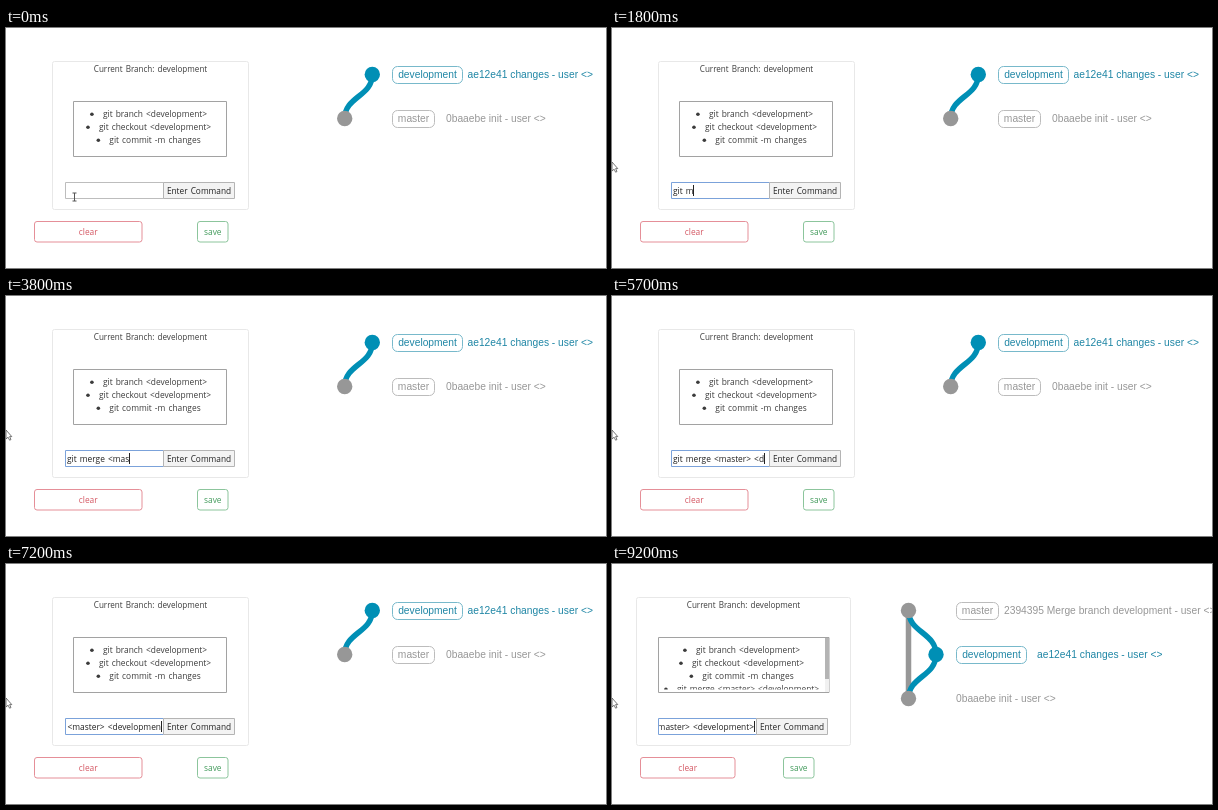
An HTML page with a canvas that plays this animation: 600x240 px, repeating every 9300 ms.

```html
<!DOCTYPE html>
<html lang="en">
<head>
<meta charset="utf-8">
<title>Git command trainer</title>
<style>
  html, body { margin: 0; width: 100%; height: 100%; overflow: hidden; background: #fff; }
  canvas { display: block; }
</style>
</head>
<body>
<canvas width="600" height="240"></canvas>
<script>
const ctx = document.querySelector('canvas').getContext('2d');
const LOOP = 9300, FOCUS = 100, ENTER = 8800, MERGED = 8900;
const INK = '#3c3c3c';
// Each theme has a solid, a text and a border colour.
const BLUE = { solid: '#008fb5', text: '#1f86a5', border: '#78b9cb' };
const GREY = { solid: '#979797', text: '#979797', border: '#bcbcbc' };
const RED = { text: '#d45763', border: '#e58f98' };
const GREEN = { text: '#459c5e', border: '#8cc59c' };
const UI = '"Open Sans", "Noto Sans", sans-serif';
const ARIAL = '"Liberation Sans", Arial, sans-serif';

const COMMAND = 'git merge <master> <development>';
// Moment at which each character of COMMAND is typed, in tenths of a second.
const KEYS = [12, 13, 14, 16, 18, 20, 23, 25, 27, 29, 32, 36, 37, 38, 40, 41, 42, 46, 48,
              54, 57, 59, 60, 62, 63, 65, 66, 67, 69, 70, 75, 79].map(k => k * 100);
const HISTORY = ['git branch <development>', 'git checkout <development>', 'git commit -m changes'];

function setFont(size, family = UI) {
  ctx.font = `${size}px ${family}`;
  ctx.wordSpacing = family === UI ? '0.9px' : '0px';
}

function text(str, x, y, size, color = INK, align = 'left', family = UI) {
  setFont(size, family);
  ctx.fillStyle = color;
  ctx.textAlign = align;
  ctx.fillText(str, x, y);
}

function box(x, y, w, h, stroke, radius = 0, fill) {
  ctx.beginPath();
  ctx.roundRect(x + .5, y + .5, w - 1, h - 1, radius);
  if (fill) { ctx.fillStyle = fill; ctx.fill(); }
  ctx.strokeStyle = stroke;
  ctx.lineWidth = 1;
  ctx.stroke();
}

function clipped(x, y, w, h, draw) {
  ctx.save();
  ctx.beginPath();
  ctx.rect(x, y, w, h);
  ctx.clip();
  draw();
  ctx.restore();
}

function button(label, x, w, theme) {
  box(x, 193, w, 21.5, theme.border, 2.5);
  text(label, x + w / 2, 207, 8.4, theme.text, 'center');
}

function history(dx, entered) {
  const x = entered ? 59 + dx : 67, w = entered ? 171.5 : 154;
  const lines = entered ? [...HISTORY, COMMAND] : HISTORY;
  box(x, 73, w, 56, '#a2a2a2');
  clipped(x + 1, 74, w - 2, 51.5, () => lines.forEach((line, i) => {
    const y = 89 + i * 13;
    text(line, 149 + dx, y, 8.4, INK, 'center');
    ctx.beginPath();
    ctx.arc(149 + dx - ctx.measureText(line).width / 2 - 11, y - 2.7, 1.8, 0, 7);
    ctx.fill();
  }));
  if (entered) {
    ctx.fillStyle = '#f1f1f1';
    ctx.fillRect(x + w - 4.5, 74, 4, 54);
    ctx.fillStyle = '#b4b4b4';
    ctx.fillRect(x + w - 4.5, 74, 4, 41);
  }
}

function commandInput(t, dx) {
  const focused = t >= FOCUS;
  const typed = KEYS.filter(k => k <= t);
  const shown = COMMAND.slice(0, typed.length);
  box(59 + dx, 154, 99, 17, focused ? '#7ba2da' : '#bdbdbd');
  clipped(60 + dx, 155, 96.5, 15, () => {
    setFont(8.4);
    const width = ctx.measureText(shown).width;
    const x = 61 + dx - Math.max(0, width - 94);
    text(shown, x, 166, 8.4, '#222');
    const idle = t - (typed.at(-1) ?? FOCUS);
    if (focused && idle % 1000 < 500) ctx.fillRect(Math.floor(x + width), 157, 1, 11);
  });
  box(157 + dx, 154, 72, 17, '#b4b4b4', 0, '#f3f3f3');
  text('Enter Command', 193 + dx, 166, 8.3, '#222', 'center');
}

function panel(t) {
  const entered = t >= ENTER, merged = t >= MERGED, dx = merged ? -13 : 0;
  if (entered) box(37 + dx, 33, 215, 149, '#e8e8e8', 2);
  else box(46, 33, 197, 149, '#e8e8e8', 2);
  text('Current Branch: development', 144.5 + dx, 44, 8.1, INK, 'center');
  history(dx, entered);
  commandInput(t, dx);
  button('clear', 28, merged ? 95.5 : 108.5, RED);
  button('save', merged ? 171 : 191, 31.5, GREEN);
}

function link(x1, y1, x2, y2, color) {
  const mid = (y1 + y2) / 2;
  ctx.beginPath();
  ctx.moveTo(x1, y1);
  ctx.bezierCurveTo(x1, mid, x2, mid, x2, y2);
  ctx.strokeStyle = color;
  ctx.lineWidth = 5.5;
  ctx.stroke();
}

function commit(x, y, theme, message, messageX, branch, branchX, branchW) {
  ctx.beginPath();
  ctx.arc(x, y, 7.7, 0, 7);
  ctx.fillStyle = theme.solid;
  ctx.fill();
  text(message, messageX, y + 3.7, 10.25, theme.text, 'left', ARIAL);
  if (branch) {
    box(branchX, y - 8.5, branchW, 18, theme.border, 5);
    text(branch, branchX + branchW / 2, y + 3.7, 10.25, theme.text, 'center', ARIAL);
  }
}

function graph(t) {
  const changes = 'ae12e41 changes - user <>', init = '0baaebe init - user <>';
  if (t < MERGED) {
    link(338.7, 90.5, 366.3, 46.5, BLUE.solid);
    commit(366.3, 46.5, BLUE, changes, 461.5, 'development', 386, 71);
    commit(338.7, 90.5, GREY, init, 440, t < ENTER && 'master', 386, 43);
  } else {
    link(296.5, 134.5, 296.5, 46.5, GREY.solid);
    link(296.5, 134.5, 324, 90.5, BLUE.solid);
    link(324, 90.5, 296.5, 46.5, BLUE.solid);
    commit(296.5, 46.5, GREY, '2394395 Merge branch development - user <>', 392, 'master', 344, 43);
    commit(324, 90.5, BLUE, changes, 425, 'development', 344, 71);
    commit(296.5, 134.5, GREY, init, 344);
  }
}

function pointer(t) {
  const p = Math.min(1, Math.max(0, (t - 300) / 700)), ease = p * p * (3 - 2 * p);
  const x = 68.5 * (1 - ease), y = 169 - 35 * ease;
  ctx.lineWidth = 1;
  ctx.strokeStyle = '#555';
  if (x > 59 && y > 154) {
    ctx.stroke(new Path2D(`M${x - 2} ${y - 4}h4m-2 0v8m-2 0h4`));
  } else {
    const arrow = new Path2D(`M${x} ${y}v9l2.1-1.8 1.5 3 1.4-.7-1.4-2.9h2.2z`);
    ctx.fillStyle = '#fff';
    ctx.fill(arrow);
    ctx.lineWidth = .8;
    ctx.stroke(arrow);
  }
}

function draw() {
  const t = Math.floor(performance.now() % LOOP / 100) * 100;
  ctx.fillStyle = '#fff';
  ctx.fillRect(0, 0, 600, 240);
  panel(t);
  graph(t);
  pointer(t);
  requestAnimationFrame(draw);
}
draw();
</script>
</body>
</html>
```
